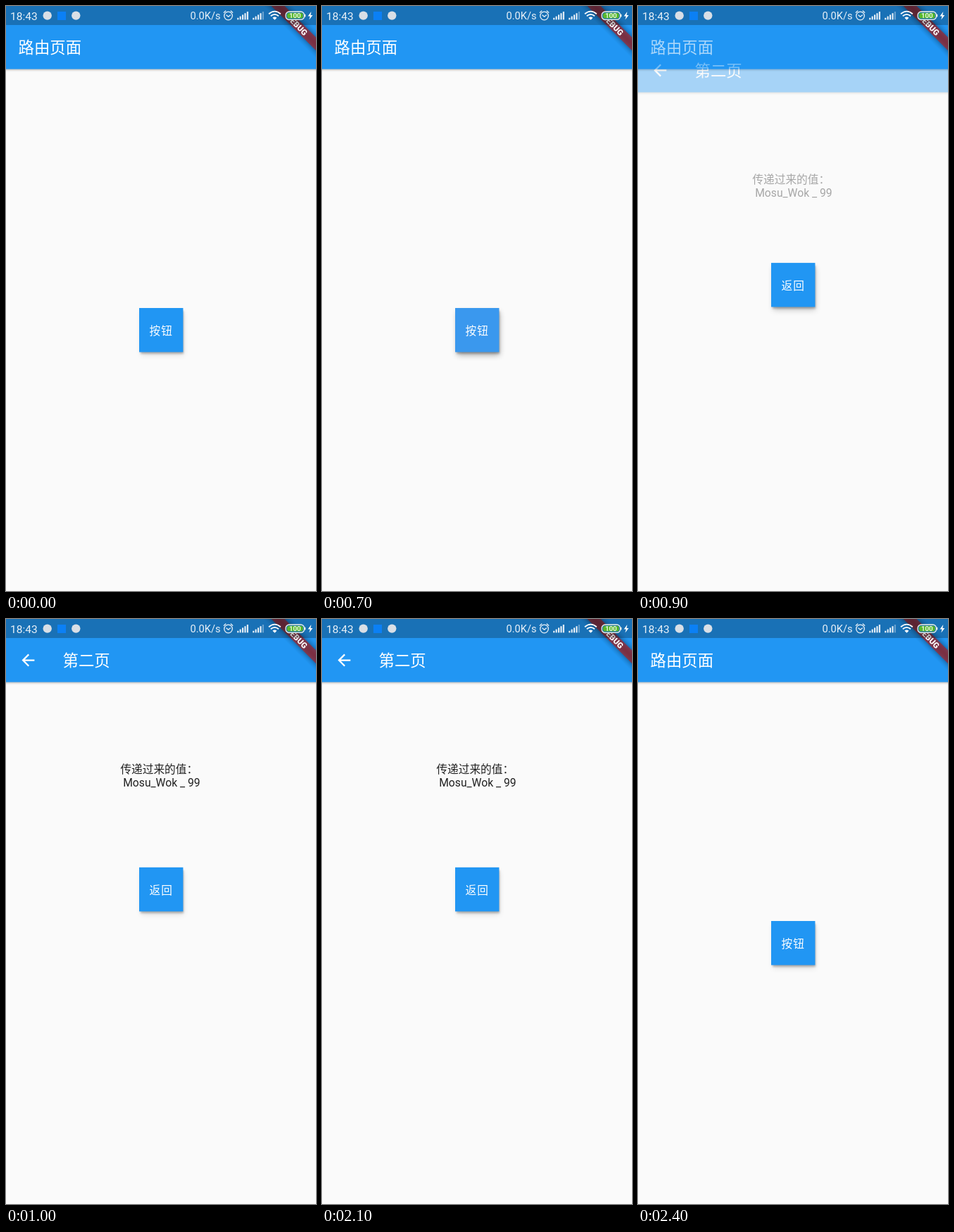
An HTML page for the animation above (2.7 s loop, 440 by 831 pixels).

```html
<!DOCTYPE html>
<html lang="zh">
<head>
<meta charset="utf-8">
<title>路由页面</title>
<style>
  html, body { margin: 0; width: 100%; height: 100%; overflow: hidden; background: #fafafa; }
  svg { display: block; width: 100%; height: 100%; }
  text { font-family: Roboto, "Noto Sans CJK SC", "Noto Sans CJK", sans-serif; font-weight: 400; }
  .title { font-size: 22.4px; font-weight: 300; fill: #fff; }
  .body { font-size: 15.68px; fill: #212121; }
  .label { font-size: 15.68px; font-weight: 300; fill: #fff; letter-spacing: 1.1px; }
  .thin { font-weight: 300; }
  .status { fill: #e9f1f8; font-size: 15.5px; }
</style>
</head>
<body>
<svg viewBox="0 0 440 831" preserveAspectRatio="none">
  <defs>
    <filter id="soft" x="-50%" y="-50%" width="200%" height="200%"><feGaussianBlur stdDeviation="1.8"/></filter>
    <filter id="wide" x="-50%" y="-50%" width="200%" height="200%"><feGaussianBlur stdDeviation="4"/></filter>
    <g id="bar">
      <rect x="-10" y="5" width="460" height="86" opacity=".26" filter="url(#soft)"/>
      <rect width="440" height="89.6" fill="#2196f3"/>
    </g>
  </defs>

  <rect width="440" height="831" fill="#fafafa"/>
  <use href="#bar"/>
  <text class="title" x="17.6" y="67.4">路由页面</text>

  <g id="second">
    <rect width="440" height="831" fill="#fafafa"/>
    <use href="#bar"/>
    <path transform="translate(18 45.1) scale(1.12)" fill="#fff"
      d="M20 11H7.83l5.59-5.59L12 4l-8 8 8 8 1.41-1.41L7.83 13H20v-2z"/>
    <text class="title" x="80.6" y="67.4">第二页</text>
    <text class="body thin" x="162.4" y="218.8">传递过来的值：</text>
    <text class="body" x="166.2" y="237.6">Mosu_Wok _ 99</text>
  </g>

  <g id="button">
    <rect id="lift" x="192" y="6" width="60" height="61" filter="url(#wide)"/>
    <rect x="191" y="4" width="61" height="61" opacity=".27" filter="url(#soft)"/>
    <rect id="face" x="189" width="62.4" height="62.6"/>
    <text class="label" id="label" x="203.6" y="37.8"></text>
  </g>

  <g transform="translate(440 0) rotate(45)">
    <rect x="-60" y="31.4" width="120" height="13.4" opacity=".5" filter="url(#wide)"/>
    <rect x="-60" y="31.4" width="120" height="13.4" fill="#b71c1c" fill-opacity=".63"/>
    <text y="42.1" text-anchor="middle" fill="#fff" style="font-size:11.4px;font-weight:900">DEBUG</text>
  </g>

  <rect width="440" height="27" fill-opacity=".25"/>
  <g class="status">
    <text x="6" y="19.6">18:43</text>
    <circle cx="58.7" cy="13.6" r="6.2" fill="#d9dfe6"/>
    <rect x="73" y="8" width="12" height="12" fill="#0b80f5"/>
    <circle cx="99.3" cy="13.6" r="6.2" fill="#d9dfe6"/>
    <text x="261.5" y="19.4" style="font-size:14.6px">0.0K/s</text>
    <g fill="none" stroke="#e9f1f8" stroke-width="1.3" stroke-linecap="round">
      <circle cx="315.5" cy="14" r="5.8"/>
      <path d="M312.9 13l2.6 2.2 2.9-2.2M309.3 9.2l2.5-2.2M321.7 9.2l-2.5-2.2"/>
    </g>
    <g id="signals"></g>
    <path d="M373 11.2q8.4-7.2 16.8 0M375.8 14.2q5.6-4.7 11.2 0" fill="none" stroke="#fff" stroke-width="1.8"/>
    <path d="M378.4 16.7q3-2.3 6 0l-3 3z" fill="#fff"/>
    <rect x="397" y="8" width="26.4" height="11.4" rx="5" fill="#1d6caf" stroke="#eef4e8" stroke-width="1.3"/>
    <rect x="398.8" y="9.8" width="22.8" height="7.8" rx="3.4" fill="#58b92d"/>
    <path d="M424.6 11.8v3.8" stroke="#eef4e8" stroke-width="1.2"/>
    <text x="410.2" y="17.2" text-anchor="middle" fill="#fff" style="font-size:9.6px;font-weight:500">100</text>
    <path d="M433.3 8l-4.8 6.4h3l-1.2 5.2 5-6.7h-3z" fill="#fff"/>
  </g>
</svg>
<script>
const LOOP = 2700, STEP = 100, FLIGHT = 150;
const PRESS = 700, PUSH = 816, POP = 2100;
const FIRST_Y = 429, SECOND_Y = 352.8, RISE = 831 / 4;
const $ = id => document.getElementById(id);
const clamp = v => Math.min(1, Math.max(0, v));

function bezier(x1, y1, x2, y2) {
  const at = (a, b, s) => 3 * a * s * (1 - s) ** 2 + 3 * b * s * s * (1 - s) + s ** 3;
  return x => {
    if (x <= 0 || x >= 1) return clamp(x);
    let lo = 0, hi = 1;
    for (let i = 0; i < 24; i++) {
      const mid = (lo + hi) / 2;
      if (at(x1, x2, mid) < x) lo = mid; else hi = mid;
    }
    return at(y1, y2, lo);
  };
}
const slide = bezier(0.4, 0, 0.2, 1);
const fade = bezier(0.42, 0, 1, 1);

function addSignal(x, lit) {
  for (let i = 0; i < 5; i++) {
    const bar = document.createElementNS("http://www.w3.org/2000/svg", "rect");
    const h = 2.6 + i * 2.2;
    const attrs = { x: x + i * 3.4, y: 19.4 - h, width: 2.1, height: h, opacity: i < lit ? 1 : 0.4 };
    for (const key in attrs) bar.setAttribute(key, attrs[key]);
    $("signals").append(bar);
  }
}
addSignal(328.2, 5);
addSignal(350.2, 4);

function draw(ms) {
  // The screen refreshes in whole steps.
  const t = Math.floor(ms / STEP) * STEP;
  const popping = t >= POP;
  const p = popping ? clamp(1 - (t - POP) / FLIGHT) : clamp((t - PUSH) / FLIGHT);
  const moved = slide(p);
  const pressed = t >= PRESS && t < PUSH;
  const flying = p > 0 && p < 1;

  $("second").setAttribute("transform", `translate(0 ${RISE * (1 - moved)})`);
  $("second").setAttribute("opacity", fade(p));
  $("button").setAttribute("transform", `translate(0 ${FIRST_Y + (SECOND_Y - FIRST_Y) * moved})`);
  $("lift").setAttribute("opacity", pressed ? 0.3 : flying ? 0.2 : 0.1);
  $("face").setAttribute("fill", pressed ? "#3a98ee" : "#2196f3");
  const onSecond = popping ? p === 1 : p > 0;
  $("label").textContent = onSecond ? "返回" : "按钮";
}

const start = performance.now();
function tick() {
  draw((performance.now() - start) % LOOP);
  requestAnimationFrame(tick);
}
draw(0);
requestAnimationFrame(tick);
</script>
</body>
</html>
```
